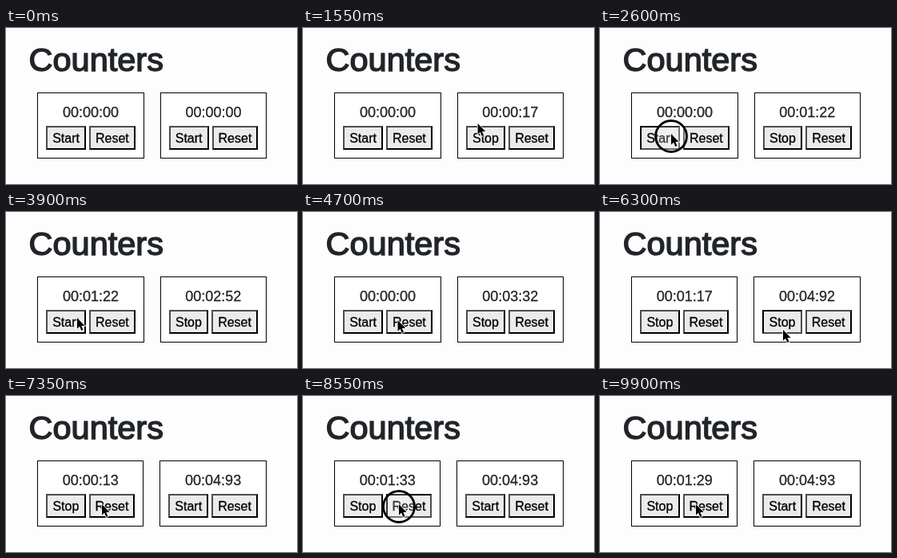
Recreate the animation shown at these times as an HTML page. Size 364x196 px, loop 9950 ms.

```html
<!DOCTYPE html>
<html lang="en">
<head>
<meta charset="utf-8">
<title>Counters</title>
<style>
  html, body { margin: 0; width: 100%; height: 100%; overflow: hidden; background: #fdfdfd; }
  body { position: relative; font-family: "Liberation Sans", Arial, sans-serif; color: #212529; }
  h1 {
    position: absolute; left: 28.5px; top: 16px; margin: 0;
    font-size: 41.5px; font-weight: 400; line-height: 47px;
    -webkit-text-stroke: 1.5px #212529;
  }
  .row { position: absolute; left: 39.15px; top: 81px; display: flex; gap: 20px; }
  .card { padding: 10px; border: 1px solid #000; background: #fff; white-space: nowrap; }
  .time { font-size: 18px; line-height: 28px; text-align: center; -webkit-text-stroke: .3px; }
  .buttons { display: flex; gap: 4px; margin-top: 3px; }
  .btn {
    min-width: 33.4px; padding: 1px 6px 0; border: 2px solid; border-color: #4c4c4c #000 #000 #4c4c4c;
    background: #ebebeb; color: #000; font-size: 16px; line-height: 25px; text-align: center;
    -webkit-text-stroke: .3px;
  }
  .btn.down { border-color: #000 #4c4c4c #4c4c4c #000; }
  svg { position: absolute; left: 0; top: 0; width: 364px; height: 196px; overflow: hidden; }
</style>
</head>
<body>
<h1>Counters</h1>
<div class="row"></div>
<svg viewBox="0 0 364 196">
  <g id="pointer">
    <circle id="ring" cy="3" r="19.5" fill="#fff" fill-opacity=".2" stroke="#000" stroke-width="2.8"/>
    <path d="M0 0V14.5L3.3 11.5L5.6 17L8 16L5.7 10.6H10.3Z" transform="scale(.94)"
      stroke="#fff" stroke-width="1.6" paint-order="stroke"/>
  </g>
</svg>
<script>
  const LOOP = 9950, STEP = 50, TRAVEL = 600, HOLD = 110, RING_DELAY = 50;
  const ENTRY = { x: 250, y: 198 };
  const left = { card: 0, x: 89, y: 133 };
  const lower = { card: 0, x: 91, y: 138 };
  const reset = { card: 0, x: 120, y: 136, reset: true };
  const right = { card: 1, x: 229, y: 148 };

  // The pointer leaves for each spot in time for its click; lift bends the way there.
  const clicks = [
    { ...right, at: 1380, leave: 850 },
    { ...left, at: 2615, leave: 1450, lift: -98 },
    { ...left, at: 3835 },
    { ...reset, at: 4480, leave: 4000 },
    { ...lower, at: 5130, leave: 4650 },
    { ...right, at: 6310, leave: 5550, lift: 16, hold: 40 },
    { ...reset, at: 7220, leave: 6800 },
    { ...reset, at: 8610 }
  ];

  const row = document.querySelector(".row");
  const pointer = document.getElementById("pointer");
  const ring = document.getElementById("ring");

  function add(parent, name, text = "") {
    const el = parent.appendChild(document.createElement("div"));
    el.className = name;
    el.textContent = text;
    return el;
  }

  const cards = [0, 1].map(() => {
    const card = add(row, "card");
    const time = add(card, "time");
    const bar = add(card, "buttons");
    return { time, toggle: add(bar, "btn", "Start"), reset: add(bar, "btn", "Reset") };
  });

  const pad = n => String(Math.floor(n)).padStart(2, "0");
  const format = ms => [ms / 60000, ms / 1000 % 60, ms / 10 % 100].map(pad).join(":");
  const ease = u => u * u * (3 - 2 * u);
  const show = (el, on) => { el.style.display = on ? "" : "none"; };

  // Replays the clicks on one card up to time t.
  function counter(index, t) {
    let total = 0, since = 0, running = false;
    for (const click of clicks) {
      if (click.card !== index || click.at > t) continue;
      if (click.reset) {
        total = 0;
      } else {
        if (running) total += click.at - since;
        running = !running;
      }
      since = click.at;
    }
    return { running, value: total + (running ? t - since : 0) };
  }

  function drawPointer(t) {
    const trips = clicks.filter(c => c.leave <= t);
    const to = trips.pop();
    show(pointer, to);
    if (!to) return;
    const from = trips.pop() || ENTRY;
    const span = Math.min(TRAVEL, to.at - HOLD - to.leave);
    const u = ease(Math.min(1, (t - to.leave) / span));
    const x = from.x + (to.x - from.x) * u;
    const y = from.y + (to.y - from.y) * u + 4 * u * (1 - u) * (to.lift || 0);
    pointer.setAttribute("transform", `translate(${x.toFixed(2)} ${y.toFixed(2)})`);
  }

  function draw(t) {
    const downAt = c => c.at - (c.hold || HOLD);
    const press = clicks.find(c => t >= downAt(c) && t < c.at);

    cards.forEach((card, i) => {
      const { running, value } = counter(i, t);
      const here = press && press.card === i;
      card.time.textContent = format(value);
      card.toggle.textContent = running ? "Stop" : "Start";
      card.toggle.classList.toggle("down", !!here && !press.reset);
      card.reset.classList.toggle("down", !!here && !!press.reset);
    });

    show(ring, clicks.some(c => t >= downAt(c) + RING_DELAY && t < c.at + RING_DELAY));
    drawPointer(t);
  }

  const origin = performance.now();
  function tick() {
    const t = (performance.now() - origin) % LOOP;
    draw(Math.floor(t / STEP) * STEP);
    requestAnimationFrame(tick);
  }
  tick();
</script>
</body>
</html>
```
